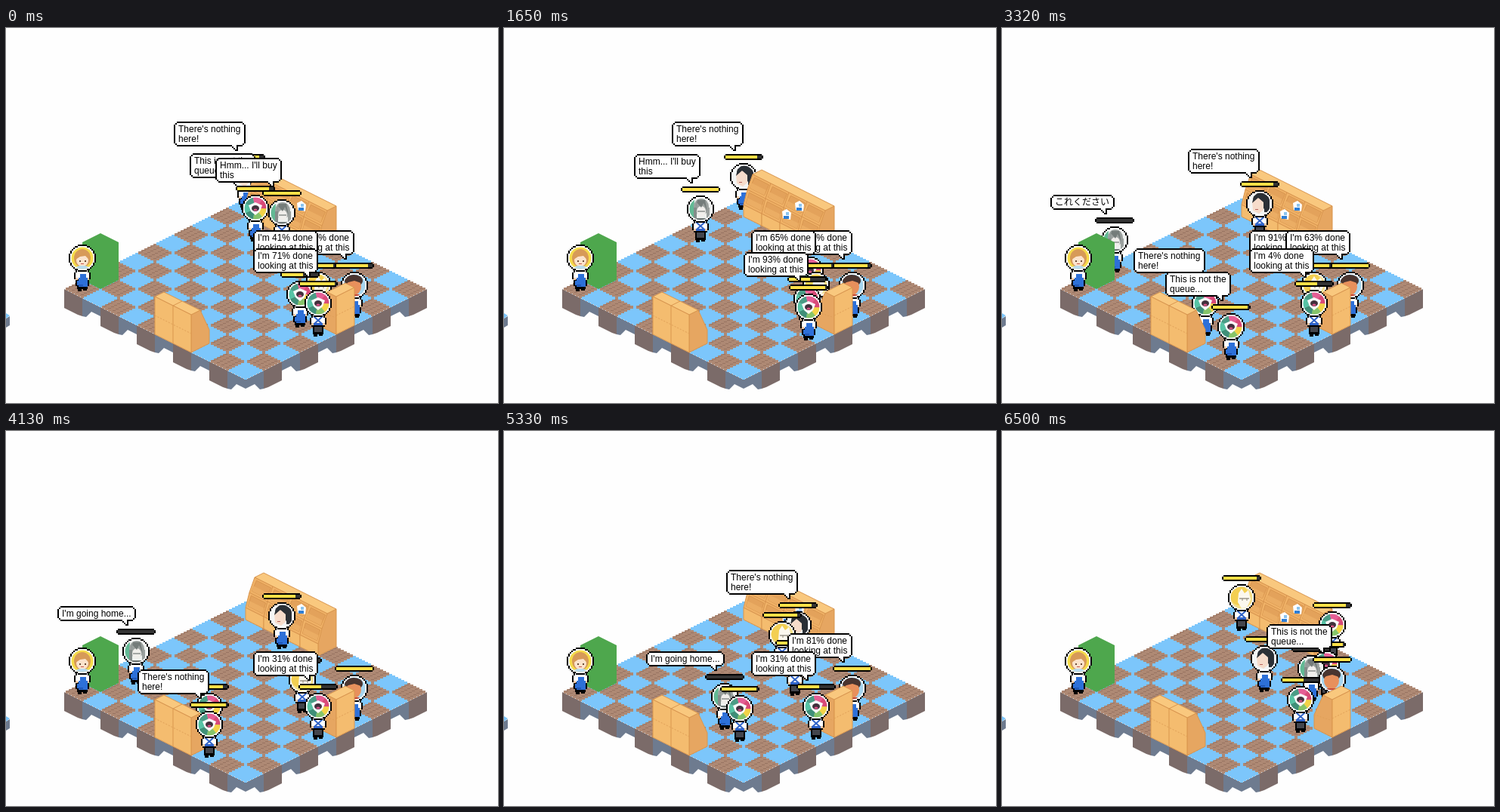
An HTML page with a canvas for the animation above (6600 ms loop, 651 by 497 pixels).

```html
<!DOCTYPE html>
<html lang="en">
<head>
<meta charset="utf-8">
<title>Isometric shop</title>
<style>
html, body { margin: 0; width: 100%; height: 100%; overflow: hidden; background: #fefefe; }
canvas { display: block; }
</style>
</head>
<body>
<canvas id="stage" width="651" height="497"></canvas>
<script>
const ctx = document.getElementById('stage').getContext('2d');
const LOOP = 6600, STEP = 240, GRID = 10;
const MOVES = { a: [-1, 0], d: [1, 0], w: [0, -1], s: [0, 1] };
const INK = '#000', WHITE = '#fff';

const iso = (i, j) => [317 + 24 * (i - j), 238 + 12 * (i + j)];

function rect(c, x, y, w, h, color) {
  c.fillStyle = color;
  c.fillRect(x, y, w, h);
}

function poly(c, color, pts, edge) {
  c.beginPath();
  pts.forEach(([x, y]) => c.lineTo(x, y));
  c.closePath();
  c.fillStyle = color;
  c.fill();
  if (edge) { c.strokeStyle = edge; c.lineWidth = 1; c.stroke(); }
}

function line(c, color, x1, y1, x2, y2, width = 1) {
  c.strokeStyle = color;
  c.lineWidth = width;
  c.beginPath();
  c.moveTo(x1, y1);
  c.lineTo(x2, y2);
  c.stroke();
}

function oval(c, color, x, y, rx, ry = rx) {
  c.fillStyle = color;
  c.beginPath();
  c.ellipse(x, y, rx, ry, 0, 0, 7);
  c.fill();
}

// ---- floor ----
function tile(c, i, j) {
  const [x, y] = iso(i, j), blue = (i + j) % 2 === 0;
  for (let r = 0; r < 12; r++) {
    const half = 4 * Math.min(r + .5, 11.5 - r);
    rect(c, x - half, y - 12 + 2 * r, 2 * half, 2, blue ? '#7cc6fb' : '#ae8974');
  }
  if (blue) return;
  for (const k of [-12, -6, 0, 6])
    for (let s = -2; s < 3; s++)
      rect(c, x + k + 4 * s, y + k / 2 - 2 * s, 4, 1, '#977361');
}

function side(c, x, y, dir, blue) {
  const x2 = x + 24 * dir, y2 = y + 12;
  poly(c, blue ? '#6e7b8f' : '#7b6b69', blue
    ? [[x, y], [x2, y2], [x2, y2 + 12], [x + 12 * dir, y + 18], [x + 5 * dir, y + 25], [x, y + 24]]
    : [[x, y], [x2, y2], [x2, y2 + 24], [x2 - 6 * dir, y2 + 22], [x, y + 25]]);
}

function floor(c) {
  for (let k = 0; k < GRID; k++) {
    const blue = k % 2 === 1;
    side(c, 77 + 24 * k, 346 + 12 * k, 1, blue);
    side(c, 557 - 24 * k, 346 + 12 * k, -1, blue);
  }
  for (let i = 0; i < GRID; i++) for (let j = 0; j < GRID; j++) tile(c, i, j);
  poly(c, '#6e7b8f', [[0, 385], [5, 382], [5, 394], [0, 397]]);
  poly(c, '#7cc6fb', [[0, 378], [5, 381], [0, 385]]);
}

// ---- furniture ----
const LIGHT = '#f4bc6f', MID = '#e6a661', TOP = '#f9c87e', SEAM = '#d9964f';

function wideShelf(c) {
  const front = (dx, dy, s) => [317 + dx + 24 * s, 250 + dy + 12 * s];
  const band = (a, b, s, e) => [front(...a, s), front(...b, s), front(...b, e), front(...a, e)];
  poly(c, MID, [[413, 298], [437, 286], [437, 236], [425, 242], [413, 270]], SEAM);
  poly(c, TOP, [[329, 194], [341, 188], [437, 236], [425, 242]], SEAM);
  const rows = [[0, 0], [0, -16], [5, -36], [12, -56]];
  for (let s = 0; s < 4; s++) for (let r = 0; r < 3; r++) {
    poly(c, r ? '#f0b267' : LIGHT, band(rows[r], rows[r + 1], s, s + 1), SEAM);
    if (!r) continue;
    const [p, q] = [rows[r], rows[r + 1]];
    poly(c, '#e3a25b', band([p[0] + 1, p[1] - 3], [q[0], q[1] + 3], s + .1, s + .9), SEAM);
    poly(c, '#ebad64', band([p[0] + 1, p[1] - 3], [p[0] + 3, p[1] - 10], s + .1, s + .9));
  }
  for (const [x, y] of [[391, 237], [374, 248]]) {
    poly(c, WHITE, [[x - 6, y - 5], [x, y - 8], [x + 6, y - 3], [x + 5, y + 6], [x - 5, y + 4]]);
    rect(c, x - 4, y + 1, 7, 4, '#2f7fd6');
    rect(c, x - 1, y - 4, 4, 4, '#8cc4ee');
  }
}

function backShelf(c) {
  poly(c, MID, [[245, 430], [269, 418], [269, 400], [257, 374], [245, 380]], SEAM);
  poly(c, TOP, [[197, 356], [209, 350], [257, 374], [245, 380]], SEAM);
  poly(c, LIGHT, [[197, 406], [245, 430], [245, 380], [197, 356]], SEAM);
  line(c, SEAM, 221, 368, 221, 418);
  line(c, SEAM, 221, 368, 233, 362);
  c.setLineDash([2, 2]);
  line(c, '#e0a058', 197, 381, 245, 405);
  c.setLineDash([]);
}

function smallShelf(c) {
  poly(c, MID, [[413, 394], [437, 406], [437, 356], [425, 350], [413, 376]], SEAM);
  poly(c, TOP, [[425, 350], [449, 338], [461, 344], [437, 356]], SEAM);
  poly(c, LIGHT, [[437, 406], [461, 394], [461, 344], [437, 356]], SEAM);
  c.setLineDash([2, 2]);
  line(c, '#e0a058', 413, 376, 437, 384);
  line(c, '#e0a058', 437, 381, 461, 369);
  c.setLineDash([]);
}

function counter(c) {
  poly(c, '#4ea74d', [[125, 272], [149, 284], [149, 334], [125, 346], [101, 334], [101, 284]]);
}

// ---- avatars, drawn around 0,0 ----
const FACES = {
  clerk(c) {
    oval(c, '#f6dc4a', 0, 0, 16);
    oval(c, '#d79a58', 0, 0, 11, 12);
    oval(c, '#fbe3cc', 0, 3, 8, 8);
    poly(c, '#d79a58', [[-9, 2], [-8, -8], [8, -8], [9, 2], [4, -3], [-3, -2]]);
    oval(c, '#b9dcef', 0, 15, 11, 5);
    rect(c, -4, 3, 2, 2, '#6a4a36');
    rect(c, 3, 3, 2, 2, '#6a4a36');
    rect(c, -2, 7, 4, 1, '#c4574c');
  },
  green(c) {
    oval(c, '#eef1ef', 0, 0, 16);
    poly(c, '#62b994', [[-16, -8], [-8, -14], [-9, 14], [-16, 8]]);
    oval(c, '#9aa09e', 1, -3, 10, 11);
    rect(c, -9, -2, 4, 15, '#848c8a');
    rect(c, 8, -2, 4, 15, '#9aa09e');
    oval(c, '#f0eeeb', 1, 3, 6, 7);
    poly(c, '#747c7a', [[-7, 3], [-5, -9], [1, -2], [4, -8], [9, 3], [6, -12], [-4, -12]]);
    line(c, '#59605f', -4, 3, 6, 3);
    rect(c, -5, 12, 12, 4, '#6e7675');
  },
  dark(c) {
    oval(c, '#f3f5f5', 0, 0, 16);
    oval(c, '#2b3036', 2, -4, 11, 11);
    rect(c, 6, -4, 7, 15, '#2b3036');
    poly(c, '#f6dccb', [[-10, -3], [-3, -9], [5, -2], [5, 8], [-1, 13], [-9, 9]]);
    poly(c, '#2b3036', [[-10, -1], [-8, -10], [2, -14], [7, -3], [-2, -8]]);
    rect(c, -6, 7, 4, 1, '#b9655c');
  },
  wheel(c) {
    ['#f3d348', '#86c46a', '#3f8f78', '#57c3a5', '#4b9c86', '#e55f95', '#d94a78'].forEach((color, k) => {
      const a = k * Math.PI * 2 / 7;
      c.fillStyle = color;
      c.beginPath();
      c.moveTo(0, 0);
      c.arc(0, 0, 17, a, a + .92);
      c.fill();
    });
    poly(c, '#fafafa', [[-9, -4], [0, -8], [9, -4], [6, 4], [0, 9], [-6, 4]]);
    oval(c, '#41303c', 0, 0, 5, 4);
    oval(c, '#d65083', 0, 2, 2.5, 1.5);
  },
  blond(c) {
    oval(c, '#f6e08a', 0, 0, 16);
    oval(c, '#f3cf52', -3, -3, 12, 13);
    poly(c, '#fbf8ee', [[-4, -6], [0, -12], [4, -6], [9, -10], [12, 2], [7, 13], [0, 14], [-5, 6]]);
    line(c, '#6d675b', -3, 1, 10, 1);
    line(c, '#8b8475', 1, 1, 1, 4);
    line(c, '#8b8475', 7, 1, 7, 4);
  },
  brown(c) {
    oval(c, '#a6d5ef', 0, 0, 16);
    oval(c, '#4a3530', -1, -6, 12, 8);
    oval(c, '#e8905c', -1, 2, 10, 11);
    poly(c, '#4a3530', [[-12, -1], [-9, -10], [8, -9], [9, -3], [0, -6], [-8, -4]]);
    poly(c, '#c94c38', [[-12, 16], [-7, 12], [6, 12], [11, 16]]);
  }
};

function body(c, back) {
  rect(c, -9, -26, 18, 16, INK);
  rect(c, -11, -22, 22, 9, INK);
  rect(c, -9, -22, 18, 7, WHITE);
  rect(c, -7, -26, 14, 14, WHITE);
  rect(c, -7, -13, 14, 13, INK);
  rect(c, -9, -15, 3, 3, '#f1c7a4');
  rect(c, 6, -15, 3, 3, '#f1c7a4');
  if (back) {
    line(c, '#2f63c8', -6, -24, 5, -14, 2);
    line(c, '#2f63c8', 6, -24, -5, -14, 2);
    rect(c, -6, -15, 12, 3, '#2f63c8');
    rect(c, -5, -10, 10, 7, '#43454c');
  } else {
    rect(c, -9, -12, 18, 8, INK);
    rect(c, -3, -20, 8, 8, '#2d70d8');
    rect(c, -5, -15, 12, 12, '#2d70d8');
    rect(c, -7, -11, 14, 6, '#2d70d8');
    rect(c, -5, -6, 6, 2, '#1f55b4');
  }
  rect(c, -6, -2, 5, 5, INK);
  rect(c, 1, -2, 5, 4, INK);
}

function makeSprite(face, back) {
  const cv = document.createElement('canvas');
  cv.width = 44;
  cv.height = 70;
  const c = cv.getContext('2d');
  c.translate(22, 62);
  body(c, back);
  c.translate(0, -41);
  for (let y = -18; y < 18; y += 2) for (let x = -18; x < 18; x += 2) {
    const r = Math.hypot(x + 1, y + 1);
    if (r < 17.8) rect(c, x, y, 2, 2, r > 16 ? INK : WHITE);
  }
  c.beginPath();
  c.arc(0, 0, 14.5, 0, 7);
  c.clip();
  FACES[face](c);
  return cv;
}

const sprites = {};
for (const face in FACES) sprites[face] = [makeSprite(face, false), makeSprite(face, true)];

// ---- people: legs are [start, moves], capitals only turn; says are [from, to, text] ----
const NOTHING = "There's nothing\nhere!", QUEUE = 'This is not the\nqueue...';
const look = n => `I'm ${n}% done\nlooking at this`;
const people = [
  { face: 'clerk', at: [0, 9], dir: 's', legs: [], says: [] },
  { face: 'dark', at: [0, 0], dir: 'd', bar: .88,
    legs: [[2010, 'sddW'], [3890, 'd'], [4300, 'dW'], [5600, 'sdss']],
    says: [[-900, 400, NOTHING], [1100, 1920, NOTHING], [2800, 3890, NOTHING], [4620, 5560, NOTHING]] },
  { face: 'green', at: [3, 1], dir: 'w', bar: 1, paid: 3060,
    legs: [[598, 'assaa'], [2030, 'ssss'], [3905, 'ddddddwwwwd']],
    says: [[-400, 1720, "Hmm... I'll buy\nthis"], [3030, 3480, 'これください'], [3510, 5700, "I'm going home..."]] },
  { face: 'wheel', at: [2, 1], dir: 's', bar: .88,
    legs: [[-110, 'sdddddsssssas'], [4170, 'wwwwwwwaw']],
    says: [[-600, 320, QUEUE], [3060, 3900, NOTHING]] },
  { face: 'wheel', at: [9, 5], dir: 'w', bar: .96,
    legs: [[1545, 'sssa'], [3180, 'sa'], [4900, 'wwwwwww']],
    says: [[-300, 960, look(71)], [960, 1980, look(93)], [2600, 3450, QUEUE], [3930, 4650, NOTHING]] },
  { face: 'wheel', at: [8, 5], dir: 'd', bar: .57,
    legs: [[1530, 'dW'], [6320, 'a']],
    says: [[1800, 3960, look(4)], [3960, 5640, look(31)], [5640, 6260, look(58)]] },
  { face: 'blond', at: [8, 4], dir: 'd', bar: .9,
    legs: [[3915, 'aawawaaawa']],
    says: [[-200, 1020, look(41)], [1020, 2160, look(65)], [2160, 3640, look(91)]] },
  { face: 'brown', at: [9, 3], dir: 's', bar: .87, gain: .04,
    legs: [[6000, 'a']],
    says: [[-500, 960, look(27)], [960, 2760, look(45)], [2760, 3900, look(63)], [4680, 5960, look(81)], [6270, LOOP, QUEUE]] }
];

function pose(p, t) {
  let [i, j] = p.at, dir = p.dir;
  for (const [start, moves] of p.legs) {
    let at = start;
    for (const m of moves) {
      if (t < at) break;
      dir = m.toLowerCase();
      if (dir !== m) continue;
      const f = Math.min(1, (t - at) / STEP);
      i += MOVES[m][0] * f;
      j += MOVES[m][1] * f;
      at += STEP;
    }
  }
  const [x, y] = iso(i, j).map(Math.round);
  return { p, x, y, depth: i + j, dir };
}

function drawPerson({ p, x, y, dir }) {
  ctx.drawImage(sprites[p.face][+(dir === 'a' || dir === 'w')], x - 22, y - 62);
}

function drawBar({ p, x, y }, t) {
  if (p.bar === undefined) return;
  const fill = t > p.paid ? 0 : Math.min(1, p.bar + (p.gain || 0) * t / 1000);
  const left = x - 24, top = y - 69;
  rect(ctx, left - 2, top, 52, 4, INK);
  rect(ctx, left, top - 2, 48, 8, INK);
  rect(ctx, left, top, 48, 4, '#333');
  rect(ctx, left, top, 2 * Math.round(24 * fill), 4, '#fde047');
}

function drawBubble({ x, y, text }) {
  const rows = text.split('\n');
  ctx.font = '12px "Liberation Sans", Arial, "Noto Sans CJK JP", "Noto Sans CJK", sans-serif';
  const w = Math.ceil(Math.max(...rows.map(r => ctx.measureText(r).width))) + 12;
  const h = 7 + 13 * rows.length, left = x - w, top = y - 81 - h, bottom = top + h;
  rect(ctx, left + 4, top, w - 8, h, INK);
  rect(ctx, left + 2, top + 2, w - 4, h - 4, INK);
  rect(ctx, left, top + 4, w, h - 8, INK);
  rect(ctx, left + 4, top + 2, w - 8, h - 4, WHITE);
  rect(ctx, left + 2, top + 4, w - 4, h - 8, WHITE);
  const tail = x - 20;
  for (let k = 0; k < 4; k++) {
    rect(ctx, tail + 2 * k, bottom - 2 + 2 * k, 10 - 2 * k, 2, INK);
    if (k < 3) rect(ctx, tail + 2 * k + 2, bottom - 2 + 2 * k, 6 - 2 * k, 2, WHITE);
  }
  ctx.fillStyle = INK;
  rows.forEach((r, k) => ctx.fillText(r, left + 6, top + 14 + 13 * k));
}

const ground = document.createElement('canvas');
ground.width = 651;
ground.height = 497;
floor(ground.getContext('2d'));

const furniture = [[.5, wideShelf], [8, counter], [13, smallShelf], [14.5, backShelf]]
  .map(([depth, draw]) => ({ depth, draw }));

function frame(now) {
  const t = now % LOOP;
  rect(ctx, 0, 0, 651, 497, '#fefefe');
  ctx.drawImage(ground, 0, 0);
  const poses = people.map(p => pose(p, t));
  [...furniture, ...poses].sort((a, b) => a.depth - b.depth)
    .forEach(o => o.draw ? o.draw(ctx) : drawPerson(o));
  poses.sort((a, b) => a.y - b.y).forEach(o => drawBar(o, t));
  const bubbles = [];
  for (const { p, x, y } of poses)
    for (const [from, to, text] of p.says)
      if (t >= from && t < to) bubbles.push({ x, y, from, text });
  bubbles.sort((a, b) => a.y - b.y || a.from - b.from).forEach(drawBubble);
}

let begin;
function tick(now) {
  begin ??= now;
  frame(now - begin);
  requestAnimationFrame(tick);
}
frame(0);
requestAnimationFrame(tick);
</script>
</body>
</html>
```
